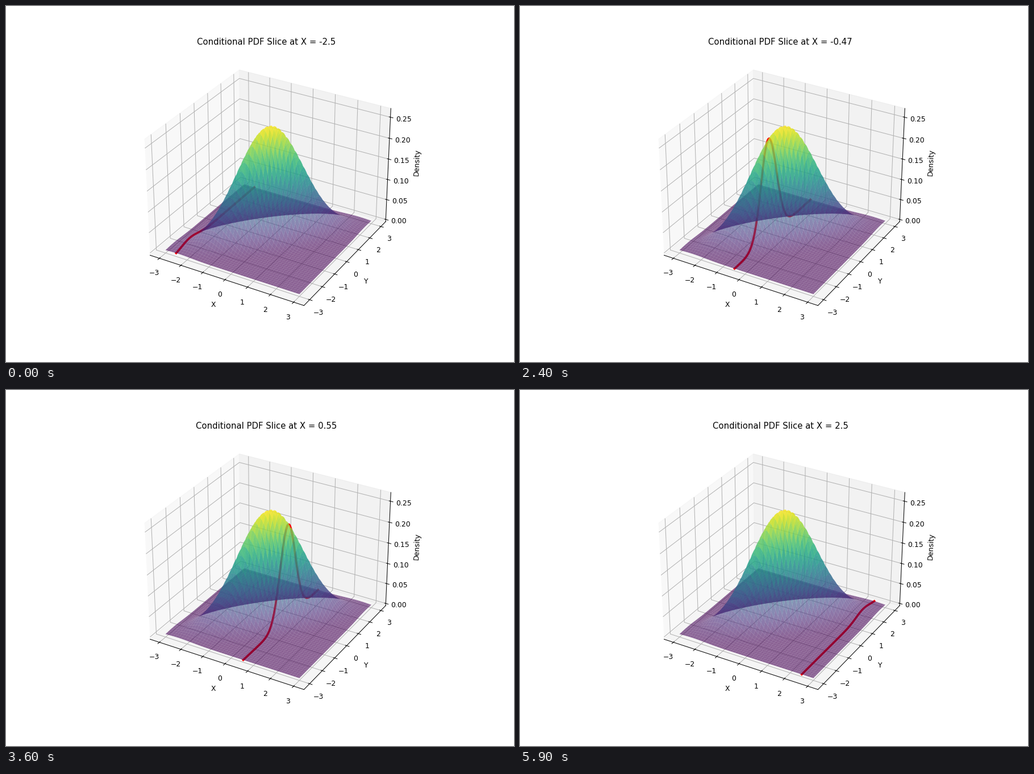
A matplotlib script for the animation above (6 s loop, 894 by 626 pixels).

```python
import numpy as np
import matplotlib.pyplot as plt
from matplotlib.animation import FuncAnimation

WIDTH, HEIGHT, DPI = 894, 626, 89.4
FRAMES, INTERVAL = 60, 100
RHO = 0.8


def density(x, y):
    """Standard bivariate normal with correlation RHO."""
    spread = 1 - RHO**2
    power = -(x**2 - 2 * RHO * x * y + y**2) / (2 * spread)
    return np.exp(power) / (2 * np.pi * np.sqrt(spread))


grid = np.linspace(-3, 3, 100)
X, Y = np.meshgrid(grid, grid)
Z = density(X, Y)
slices = np.linspace(-2.5, 2.5, FRAMES)

# The tiny surplus keeps the pixel size from rounding down.
fig = plt.figure(figsize=((WIDTH + 1e-4) / DPI, (HEIGHT + 1e-4) / DPI), dpi=DPI)
ax = fig.add_subplot(111, projection="3d")
ax.plot_surface(X, Y, Z, cmap="viridis", alpha=0.6)
curve, = ax.plot([], [], [], color="red", linewidth=3)

side = 3.3 * (1 + 1 / 24)
pad = Z.max() / 48
ax.set_xlim(-side, side)
ax.set_ylim(-side, side)
ax.set_zlim(-pad, Z.max() + pad)
ax.set_xlabel("X")
ax.set_ylabel("Y")
ax.set_zlabel("Density")


def update(i):
    x = slices[i]
    curve.set_data_3d(np.full_like(grid, x), grid, density(x, grid))
    title = ax.set_title(f"Conditional PDF Slice at X = {round(float(x), 2)}")
    return curve, title


anim = FuncAnimation(fig, update, frames=FRAMES, interval=INTERVAL,
                     repeat=True, repeat_delay=0)
plt.show()
```
